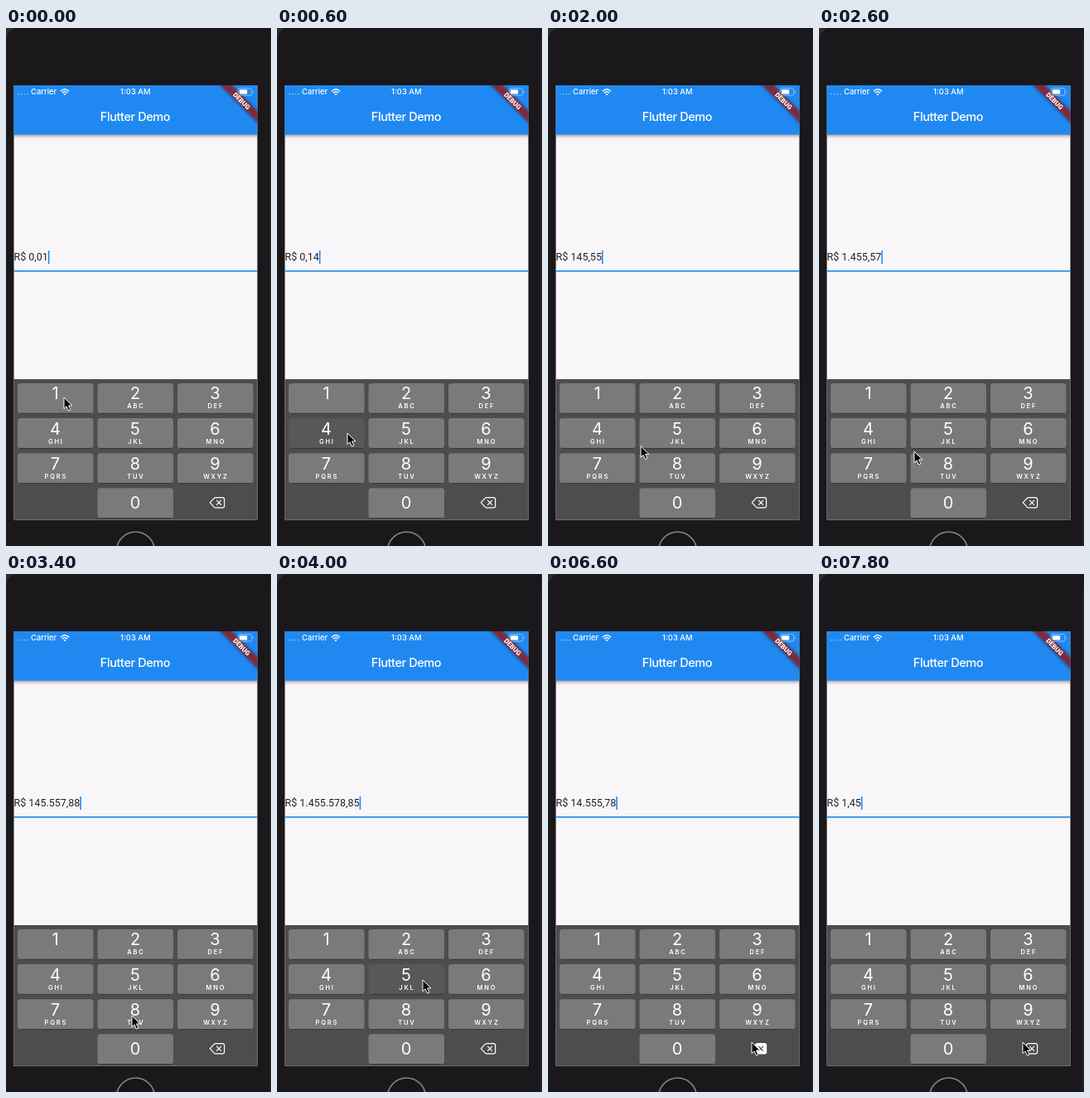
Write an HTML page that moves like this. It is 320 px wide and 624 px high and loops after 8000 ms.

```html
<!DOCTYPE html>
<html lang="en">
<head>
<meta charset="utf-8">
<title>Currency input</title>
<style>
  html, body { margin: 0; height: 100%; overflow: hidden; background: #1a181b; }
  svg { display: block; width: 100vw; height: 100vh; font-family: Inter, sans-serif; }
  .mid { text-anchor: middle; }
  .key rect { fill: #7a7a7c; }
  .key.down rect { fill: #58585a; }
  .digit { font-size: 20px; font-weight: 400; }
  .letters { font-size: 7.5px; font-weight: 600; letter-spacing: 1.8px; }
  #erase path { fill: none; stroke: #fff; stroke-width: 1.2; stroke-linejoin: round; stroke-linecap: round; }
  #erase.down .body { fill: #fff; }
  #erase.down .cross { stroke: #4d4d4f; }
</style>
</head>
<body>
<svg viewBox="0 0 320 624" preserveAspectRatio="none">
  <defs>
    <clipPath id="screen"><rect x="9.5" y="69" width="294" height="523.5"/></clipPath>
    <filter id="blur" x="-30%" y="-50%" width="160%" height="200%"><feGaussianBlur stdDeviation="2"/></filter>
  </defs>

  <rect width="320" height="624" fill="#1a181b"/>
  <path d="M0 0H10Q3 4 0 12Z" fill="#2c2b2e"/>
  <path d="M318.5 14V624" stroke="#242326"/>
  <circle cx="156.5" cy="630" r="23" fill="#171518" stroke="#858387" stroke-width="1.6"/>

  <g clip-path="url(#screen)">
    <rect x="9" y="69" width="295" height="524" fill="#f8f6f9"/>
    <rect x="5" y="70" width="303" height="60" fill="#000" opacity=".4" filter="url(#blur)"/>
    <rect x="9" y="69" width="295" height="59.5" fill="#2089f1"/>
    <text class="mid" x="156" y="112" fill="#fff" font-size="14.5" font-weight="500" letter-spacing="-.4">Flutter Demo</text>

    <g transform="translate(303.5 69) rotate(45)">
      <rect x="-40" y="22" width="80" height="9.4" opacity=".5" filter="url(#blur)"/>
      <rect x="-40" y="22" width="80" height="9.4" fill="#b71c1c" fill-opacity=".627"/>
      <text class="mid" x="0" y="29.6" fill="#fff" font-size="8" font-weight="900" font-family="Roboto, sans-serif">DEBUG</text>
    </g>

    <g fill="#fff" font-size="9.4" font-weight="500">
      <g id="signal" opacity=".45"></g>
      <text x="30" y="80.3">Carrier</text>
      <text class="mid" x="156.3" y="80.3">1:03 AM</text>
      <g fill="none" stroke="#fff" stroke-width="1.5">
        <path d="M66 76.2Q71 71.4 76 76.2M67.9 78.2Q71 75.2 74.1 78.2"/>
        <path d="M71 81.2L69.4 79.6Q71 78.2 72.6 79.6Z" fill="#fff" stroke="none"/>
      </g>
      <rect x="280.2" y="72.7" width="16.6" height="8.4" rx="2" fill="none" stroke="#fff" stroke-opacity=".6" stroke-width=".8"/>
      <rect x="281.8" y="74.2" width="9.4" height="5.4" rx=".9"/>
      <path d="M298 75.4Q299.8 76.9 298 78.4Z" opacity=".7"/>
    </g>

    <text id="amount" x="9.5" y="280.3" fill="#242326" font-size="12.5" font-family="Roboto, sans-serif"></text>
    <rect id="caret" y="268" width="1.6" height="16" fill="#2089f1"/>
    <rect x="9" y="292" width="295" height="1.6" fill="#2089e8"/>

    <rect x="9" y="423" width="295" height="170" fill="#4d4d4f"/>
    <g id="keys" fill="#fff"></g>
    <g id="erase">
      <path class="body" d="M246.3 571.7L251.3 566.3Q252 565.6 253 565.6H261.5Q263.6 565.6 263.6 567.7V575.7Q263.6 577.8 261.5 577.8H253Q252 577.8 251.3 577.1Z"/>
      <path class="cross" d="M254.5 569.1L259.7 574.3M259.7 569.1L254.5 574.3"/>
    </g>
  </g>

  <path id="pointer" d="M0 0V13.6L3.1 10.8L5.4 16L7.9 15L5.6 9.9H9.8Z" stroke="#fff" stroke-width="1" stroke-linejoin="round"/>
</svg>

<script>
const LOOP = 8000, STEP = 200;
const DIGITS = "14555788555";
const TYPE_TIMES = [600, 1200, 1600, 1800, 2200, 2800, 3200, 4000, 4400, 4800];
const ERASE_TIMES = [5600, 5800, 6200, 6600, 6800, 7200, 7400, 7600];
// Pointer stops: time, x, y
const STOPS = [
  [0, 70, 445], [200, 71, 447], [600, 85, 488], [800, 87, 489], [1200, 125, 490],
  [1400, 127, 496], [1800, 127, 496], [2200, 97, 511], [2400, 99, 511], [2600, 115, 510],
  [2800, 150, 531], [3400, 152, 532], [3800, 176, 489], [4800, 176, 489],
  [5200, 238, 555], [5400, 246, 564], [LOOP, 246, 564]
];

const byId = id => document.getElementById(id);

function add(parent, tag, attrs, text = "") {
  const node = document.createElementNS("http://www.w3.org/2000/svg", tag);
  for (const name in attrs) node.setAttribute(name, attrs[name]);
  node.textContent = text;
  return parent.appendChild(node);
}

for (let i = 0; i < 4; i++) add(byId("signal"), "circle", { cx: 15 + i * 3.7, cy: 79.6, r: 0.9 });

const LETTERS = ["", "ABC", "DEF", "GHI", "JKL", "MNO", "PQRS", "TUV", "WXYZ"];
const keys = {};

function addKey(digit, col, row, letters) {
  const x = 14 + col * 96.5, y = 428 + row * 42.1, cx = x + 45.5;
  const key = keys[digit] = add(byId("keys"), "g", { class: "key" });
  add(byId("keys"), "path", { d: `M${x + 3} ${y + 36.3}h85.5`, stroke: "#303032", "stroke-width": 0.8 });
  add(key, "rect", { x, y, width: 91.5, height: 36, rx: 3.6 });
  add(key, "text", { class: "digit mid", x: cx, y: y + (row === 3 ? 24.8 : 19.4) }, digit);
  add(key, "text", { class: "letters mid", x: cx + 0.9, y: y + 30.4 }, letters);
}
LETTERS.forEach((letters, i) => addKey(String(i + 1), i % 3, Math.floor(i / 3), letters));
addKey("0", 1, 3, "");

function money(digits) {
  const padded = digits.padStart(3, "0");
  const whole = padded.slice(0, -2).replace(/\B(?=(\d{3})+$)/g, ".");
  return `R$ ${whole},${padded.slice(-2)}`;
}

function pointerAt(t) {
  const i = STOPS.findIndex(stop => stop[0] > t);
  const [t0, x0, y0] = STOPS[i - 1], [t1, x1, y1] = STOPS[i];
  const p = (t - t0) / (t1 - t0);
  return [x0 + (x1 - x0) * p, y0 + (y1 - y0) * p];
}

const passed = (times, t) => times.filter(time => time <= t).length;
const held = (time, t) => t >= time && t < time + STEP;

function draw(t) {
  const typed = 1 + passed(TYPE_TIMES, t);
  const amount = byId("amount");
  amount.textContent = money(DIGITS.slice(0, typed - passed(ERASE_TIMES, t)));
  byId("caret").setAttribute("x", 9.5 + amount.getComputedTextLength());

  const active = TYPE_TIMES.findIndex(time => held(time, t));
  for (const digit in keys) {
    keys[digit].classList.toggle("down", active >= 0 && digit === DIGITS[active + 1]);
  }
  byId("erase").classList.toggle("down", ERASE_TIMES.some(time => held(time, t)));
  byId("pointer").setAttribute("transform", `translate(${pointerAt(t)})`);
}

const start = performance.now();
function tick() {
  const t = (performance.now() - start) % LOOP;
  draw(Math.floor(t / STEP) * STEP);
  requestAnimationFrame(tick);
}
tick();
</script>
</body>
</html>
```
